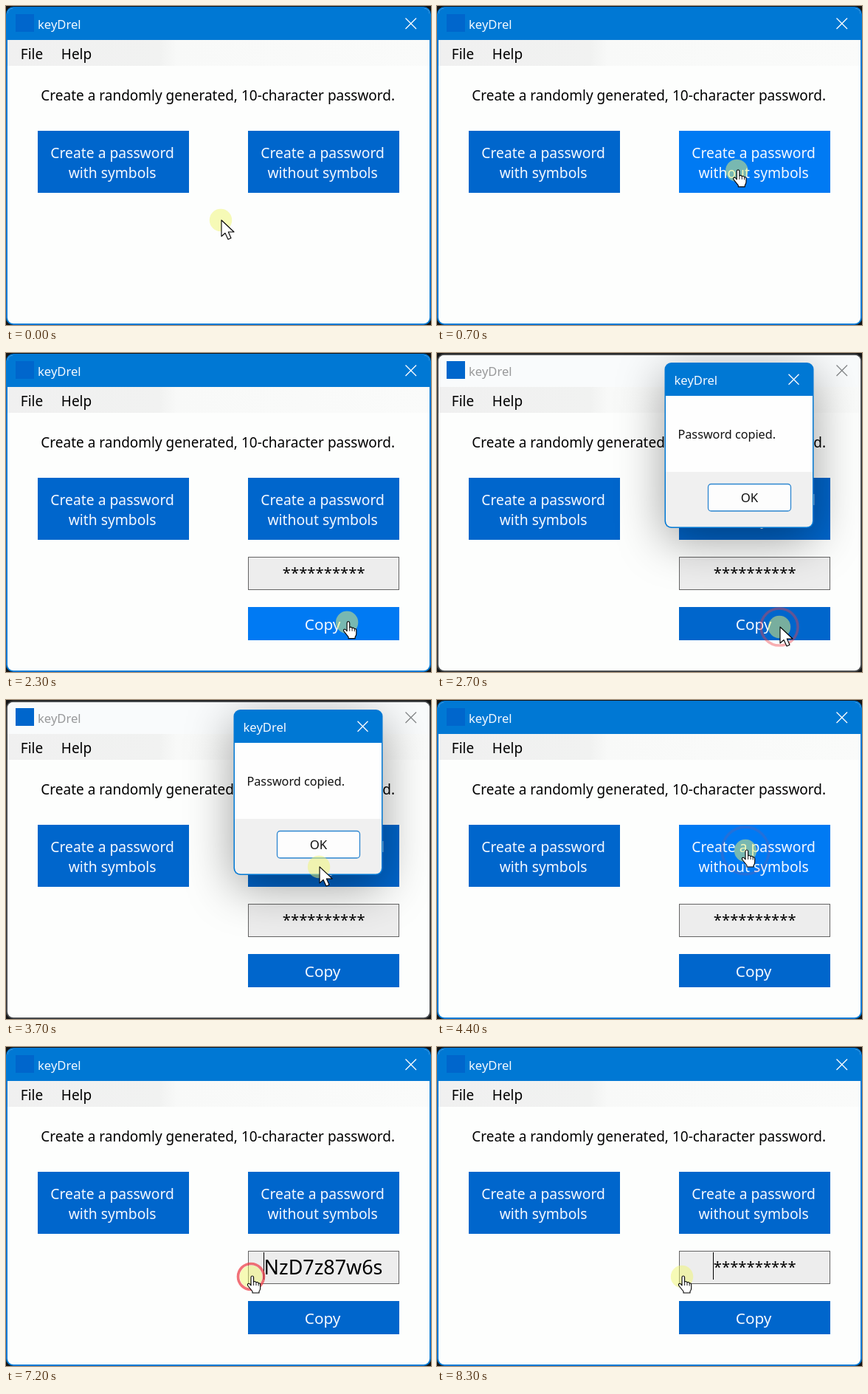
These frames come from a looping animation (576 by 432 pixels, 8400 ms). An HTML page with a canvas:

```html
<!DOCTYPE html>
<html lang="en">
<head>
<meta charset="utf-8">
<title>keyDrel</title>
<style>
html, body { margin: 0; width: 100%; height: 100%; overflow: hidden; background: #151515; }
canvas { display: block; width: 576px; height: 432px; }
</style>
</head>
<body>
<canvas id="stage" width="576" height="432"></canvas>
<script>
const ctx = document.getElementById('stage').getContext('2d');
const LOOP = 8400, STEP = 100;
const APP = 'keyDrel';
const BLUE = '#0066cc', HOVER = '#007af3', BAR = '#0078d4';

// pointer legs: start, end, target x, target y
const START = [291, 290];
const MOVES = [
  [50, 850, 418, 216],
  [1580, 2400, 464, 371],
  [2850, 3950, 418, 204],
  [4420, 5600, 332, 311]
];
// press and release times
const CLICKS = [[950, 1050], [2480, 2595], [4000, 4200], [5800, 5950], [7100, 7250]];
const RIPPLE = 250, BLINK = 525;
const FIELD_AT = 1050, OPEN = 2595, CLOSE = 4200, SHOW = 5950, HIDE = 7250;

const ARROW = new Path2D('M0 0V22L5 17.500L9 26L13 24.200L9.300 16H17Z');
const HAND = new Path2D('M-1 1Q-1-1 .8-1Q2.600-1 2.600 1V7Q5 5.800 6 7.800Q8.400 6.800 9.200 9' +
  'Q11.700 8.300 11.700 11V15.500Q11.700 18 10 20V22H1V20L-5 12.500Q-6.500 9.800-4.200 9.300Q-2.800 9.300-1 12Z');

const ease = p => p * p * (3 - 2 * p);

function pointer(t) {
  let [x, y] = START;
  for (const [a, b, tx, ty] of MOVES) {
    if (t < a) break;
    const k = ease(Math.min(1, (t - a) / (b - a)));
    x += (tx - x) * k;
    y += (ty - y) * k;
  }
  return { x, y };
}

function rect(x, y, w, h, color) {
  ctx.fillStyle = color;
  ctx.fillRect(x, y, w, h);
}

function rounded(x, y, w, h, r) {
  ctx.beginPath();
  ctx.roundRect(x, y, w, h, r);
}

function text(s, x, y, size, color, align = 'left') {
  ctx.font = `${size}px "Noto Sans", "Open Sans", sans-serif`;
  ctx.textAlign = align;
  ctx.fillStyle = color;
  ctx.fillText(s, x, y);
}

function cross(x, y, size, color) {
  ctx.beginPath();
  ctx.moveTo(x, y);
  ctx.lineTo(x + size, y + size);
  ctx.moveTo(x + size, y);
  ctx.lineTo(x, y + size);
  ctx.strokeStyle = color;
  ctx.lineWidth = 1.3;
  ctx.stroke();
}

function button(x, y, w, h, lines, hot, size = 19.3) {
  rect(x, y, w, h, hot ? HOVER : BLUE);
  const base = y + h / 2 + 8.5 - (lines.length - 1) * 13.5;
  lines.forEach((s, i) => text(s, x + w / 2 - 1.4, base + i * 27, size, '#f4f9ff', 'center'));
}

function inside(p, x, y, w, h) {
  return p.x >= x && p.x < x + w && p.y >= y && p.y < y + h;
}

function drawField(t) {
  rect(328, 276, 205, 45, '#ededed');
  ctx.strokeStyle = '#646464';
  ctx.lineWidth = 1;
  ctx.strokeRect(328.5, 276.5, 204, 44);
  const shown = t >= SHOW && t < HIDE;
  if (shown) text('NzD7z87w6s', 430, 308, 26.9, '#000', 'center');
  else text('*'.repeat(10), 430.7, 304.5, 20.3, '#000', 'center');
  const since = t - (t >= HIDE ? HIDE : SHOW);
  const lit = t >= 7100 && t < HIDE || Math.floor(since / BLINK) % 2 === 0;
  if (t >= 5800 && lit) rect(shown ? 349 : 374, 278, 1, 37, '#000');
}

function drawWindow(t, p, modal) {
  rect(0, 0, 576, 432, '#151515');
  ctx.save();
  rounded(0, 1, 576, 431, 10);
  ctx.clip();
  rect(0, 0, 576, 432, modal ? '#45484b' : BAR);
  rounded(2, 3, 572, 427, 8);
  ctx.clip();
  rect(2, 3, 572, 427, '#fdfefd');
  rect(2, 2, 572, 44, modal ? '#f9fbfc' : BAR);
  const menu = ctx.createLinearGradient(2, 0, 574, 0);
  menu.addColorStop(0, '#f0f0f0');
  menu.addColorStop(.36, '#f1f2f1');
  menu.addColorStop(.4, '#f8f9f8');
  menu.addColorStop(1, '#fafbfa');
  rect(2, 46, 572, 35, menu);
  ctx.restore();

  rect(13, 11, 25, 24, BLUE);
  text(APP, 43, 31, 16.6, modal ? '#98999a' : '#f4faff');
  cross(541.5, 16.5, 14.5, modal ? '#858789' : '#fff');
  text('File', 19.8, 72, 19, '#000');
  text('Help', 74.8, 72, 19, '#000');
  text('Create a randomly generated, 10-character password.', 287.2, 128, 19, '#000', 'center');

  const hot = (...box) => !modal && inside(p, ...box);
  button(43, 169, 205, 84, ['Create a password', 'with symbols'], hot(43, 169, 205, 84));
  button(328, 169, 205, 84, ['Create a password', 'without symbols'], hot(328, 169, 205, 84));
  if (t >= FIELD_AT) {
    drawField(t);
    button(328, 344, 205, 45, ['Copy'], hot(328, 344, 205, 45), 20.8);
  }
}

function drawDialog(p) {
  ctx.save();
  ctx.shadowColor = 'rgba(0,0,0,.38)';
  ctx.shadowBlur = 64;
  ctx.shadowOffsetY = 16;
  rounded(308.5, 13, 202, 224, 9);
  ctx.fillStyle = BAR;
  ctx.fill();
  ctx.restore();

  ctx.save();
  rounded(310, 14.5, 199, 221, 8);
  ctx.clip();
  rect(310, 14, 199, 44, BAR);
  rect(310, 58, 199, 103, '#fefefe');
  rect(310, 161, 199, 76, '#f0f0f0');
  ctx.restore();

  text(APP, 321.5, 43, 16.6, '#f4faff');
  cross(476.5, 28.7, 14, '#fff');
  text('Password copied.', 326.5, 115.5, 16.2, '#111');
  rounded(367.5, 177.5, 112, 36.5, 4);
  ctx.fillStyle = inside(p, 367, 177, 113, 37) ? '#e0eef9' : '#fdfdfd';
  ctx.fill();
  ctx.strokeStyle = '#2d86d0';
  ctx.lineWidth = 1.3;
  ctx.stroke();
  text('OK', 423.5, 201.5, 16.8, '#111', 'center');
}

function ring(p, r, alpha) {
  ctx.beginPath();
  ctx.arc(p.x, p.y, r, 0, 2 * Math.PI);
  ctx.strokeStyle = `rgba(238,60,70,${alpha})`;
  ctx.lineWidth = 3.6;
  ctx.stroke();
}

function drawPointer(t, p, modal) {
  ctx.beginPath();
  ctx.arc(p.x, p.y, 15.2, 0, 2 * Math.PI);
  ctx.fillStyle = 'rgba(240,246,112,.5)';
  ctx.fill();
  for (const [down, up] of CLICKS) {
    if (t >= down && t < up) ring(p, 17.5, .72);
    else if (t >= up && t < up + RIPPLE) {
      const k = (t - up) / RIPPLE;
      ring(p, 17.5 + 18 * k, .72 * (1 - k));
    }
  }
  const link = !modal && (inside(p, 328, 169, 205, 84) ||
    t >= FIELD_AT && (inside(p, 328, 276, 205, 45) || inside(p, 328, 344, 205, 45)));
  ctx.save();
  ctx.translate(p.x + 1, p.y);
  const shape = link ? HAND : ARROW;
  ctx.lineJoin = 'round';
  ctx.lineWidth = 1.1;
  ctx.strokeStyle = '#000';
  ctx.fillStyle = '#fff';
  ctx.fill(shape);
  ctx.stroke(shape);
  if (link) {
    ctx.lineWidth = .9;
    ctx.stroke(new Path2D('M2.600 7V12M6 8V12M9.200 9V12.500'));
  }
  ctx.restore();
}

function draw(t) {
  const p = pointer(t);
  const modal = t >= OPEN && t < CLOSE;
  drawWindow(t, p, modal);
  if (modal) drawDialog(p);
  drawPointer(t, p, modal);
}

const begin = performance.now();
function tick() {
  const t = (performance.now() - begin) % LOOP;
  draw(Math.floor(t / STEP) * STEP);
  requestAnimationFrame(tick);
}
tick();
</script>
</body>
</html>
```
